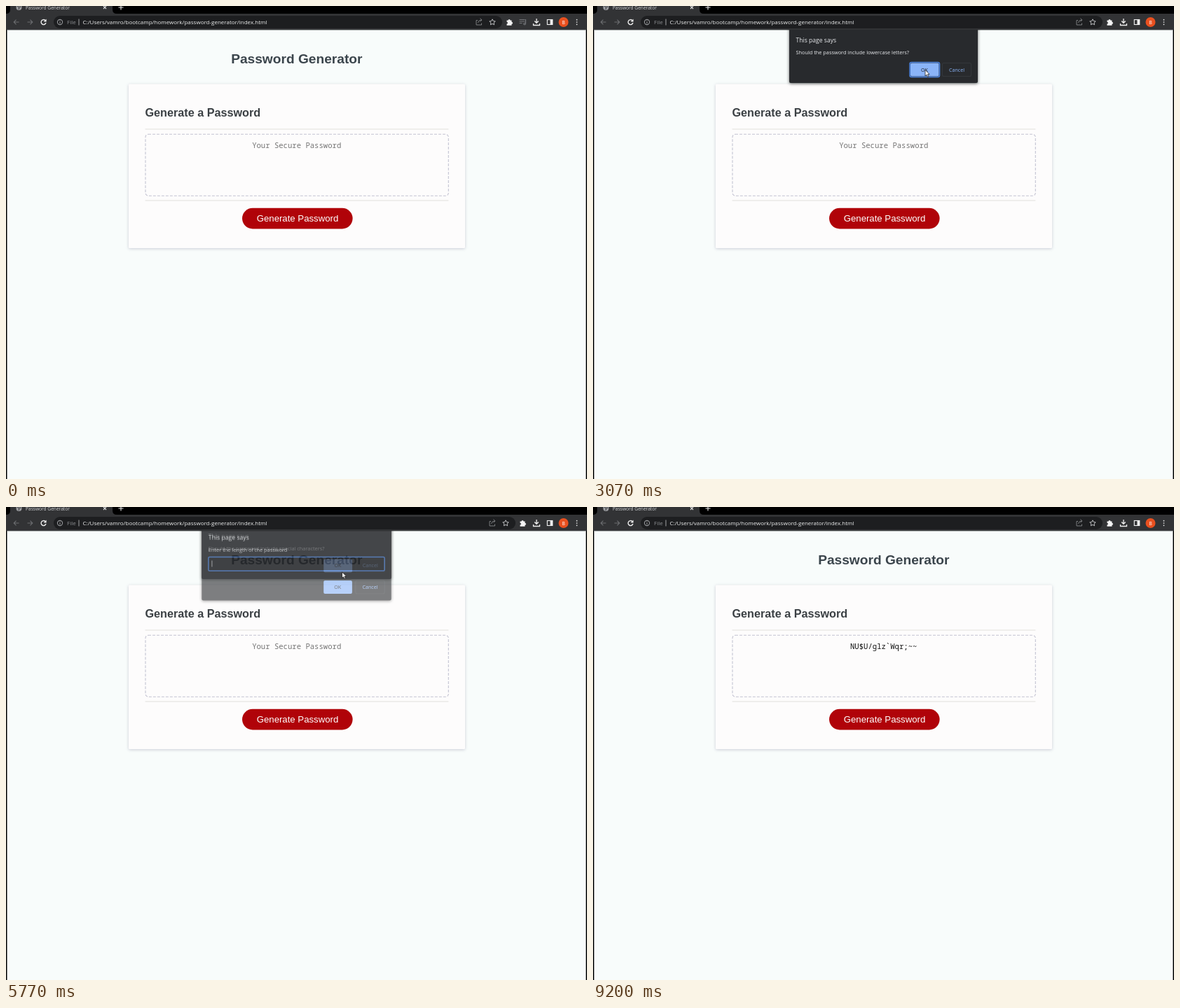
Write an HTML page that moves like this. It is 829x676 px and loops after 9230 ms.

```html
<!DOCTYPE html>
<html lang="en">
<head>
<meta charset="utf-8">
<title>Password Generator</title>
<style>
  html, body { margin: 0; width: 100%; height: 100%; overflow: hidden; background: #000; }
  svg { display: block; font-family: "Open Sans", "Noto Sans", sans-serif; }
  .page { font-family: "Liberation Sans", Arial, sans-serif; }
  .mono { font: 10.6px "Noto Sans Mono", "DejaVu Sans Mono", monospace; text-anchor: middle; }
  .line { fill: none; stroke-width: 1.1; }
  .card { filter: drop-shadow(0 1px 2px #8888a066); }
  .box { filter: drop-shadow(0 1px 2px #0009); }
</style>
</head>
<body>
<svg width="829" height="676" viewBox="0 0 829 676">
  <defs>
    <clipPath id="view"><rect x="2" y="33.5" width="825" height="643"/></clipPath>
  </defs>
  <rect width="829" height="676"/>

  <g class="page">
    <rect x="1.5" y="34" width="826" height="642" fill="#f8fcfb"/>
    <text x="414.8" y="82" font-size="19.15" font-weight="700" text-anchor="middle" fill="#3b454c">Password Generator</text>
    <rect class="card" x="175" y="111.5" width="480" height="234.5" rx="1.5" fill="#fdfcfc"/>
    <text x="198.5" y="158" font-size="16.2" font-weight="700" fill="#3b4044">Generate a Password</text>
    <path class="line" d="M198.5 176H631.5M198.5 278H631.5" stroke="#e2e2de"/>
    <rect class="line" x="199" y="183.3" width="432.3" height="88" rx="4" stroke="#c4c4d2" stroke-dasharray="4 2"/>
    <text id="result" class="mono" x="414.7" y="203"></text>
    <rect x="337" y="288.8" width="157.6" height="29.6" rx="14.8" fill="#b00309"/>
    <text x="416" y="307.7" font-size="13.2" text-anchor="middle" fill="#fff">Generate Password</text>
  </g>

  <g>
    <path d="M0 11Q6 11 6 5V0H152V5Q152 11 158 11H829V34H0Z" fill="#323335"/>
    <path d="M2 34H827" stroke="#4b4c4e" stroke-width=".8"/>
    <circle cx="18.5" cy="2" r="4" fill="#9b9da0"/>
    <path d="M16 0l3 2-1 3M19 -1l2 3" class="line" stroke="#414346"/>
    <text x="28" y="4.6" font-size="6.6" fill="#d4d6d8">Password Generator</text>
    <path class="line" d="M139 0l4 4m0 -4l-4 4M160.5 2h7M164 -1v6.5" stroke="#e8e8e8"/>
    <rect id="omnibox" x="68" y="14" height="18" rx="9" fill="#1d1e20"/>
    <path class="line" d="M18.5 23H11.5m3 -3.3l-3.3 3.3l3.3 3.3M30.5 23H37.5m-3 -3.3l3.3 3.3l-3.3 3.3" stroke="#6c6e71"/>
    <path class="line" d="M56 20.5a3.5 3.5 0 1 0 1 3.5" stroke="#eee" style="stroke-width:1.4"/>
    <path d="M57.6 18.6v4h-4z" fill="#eee"/>
    <circle class="line" cx="77" cy="23" r="3.6" stroke="#95979a"/>
    <path class="line" d="M77 22.5v2.5M77 20.7v.9M104 18.5v9" stroke="#95979a"/>
    <text x="87" y="26" font-size="8" fill="#8c8e91">File</text>
    <text x="109.5" y="26" font-size="8" fill="#eceded">C:/Users/vamro/bootcamp/homework/password-generator/index.html</text>
    <g id="tools">
      <path class="line" d="M673 20.5h-2v6.5h7.5v-2.5M673.5 24q.5 -4 5 -4m-2 -2.3l2.5 2.3l-2.5 2.3" stroke="#85878a" style="stroke-width:.9"/>
      <path class="line" d="M694 18.8l1.3 2.7 2.9.4 -2.1 2 .5 2.9 -2.6 -1.4 -2.6 1.4 .5 -2.9 -2.1 -2 2.9 -.4z" stroke="#cfd0d2" style="stroke-width:.9"/>
      <path d="M714.5 20.5h2a1.5 1.5 0 0 1 3 0h2v2.2a1.5 1.5 0 0 1 0 3v2h-7v-2.2a1.3 1.3 0 0 0 0 -2.7z" fill="#f4f4f4"/>
    </g>
    <g id="media" class="line" stroke="#74767a">
      <path d="M732.5 19.5h8M732.5 22h8M732.5 24.5h4M741.5 19v6"/>
      <circle cx="740" cy="25.5" r="1.3"/>
    </g>
    <path class="line" d="M757 18v6m-2.8 -2.5l2.8 2.8l2.8 -2.8M752.5 25v2.5h9V25" stroke="#eee" style="stroke-width:1.3"/>
    <rect class="line" x="772.3" y="19.5" width="7.5" height="7" stroke="#f4f4f4"/>
    <path d="M776.5 19.5h3.5v7h-3.5z" fill="#f4f4f4"/>
    <circle cx="795.5" cy="23" r="7" fill="#e9501f"/>
    <text x="795.5" y="25.5" font-size="7" text-anchor="middle" fill="#fff">B</text>
    <path d="M814.5 19.7v7" stroke="#eee" stroke-width="1.7" stroke-linecap="round" stroke-dasharray="0 3.3"/>
  </g>

  <g id="dialogs" clip-path="url(#view)"></g>

  <g id="cursor" fill="#fff" stroke="#111" stroke-width=".7" stroke-linejoin="round">
    <path id="arrow" d="M0 0V8.5L2 6.7 3.5 9.8 4.9 9.1 3.5 6.1H6.2Z"/>
    <path id="hand" d="M-1 .8Q0 -.4 1 .8V4Q2.2 3.4 2.7 4.4 4 4 4.3 5 5.5 5 5.5 6.2V8.5Q5 10.5 4.3 11H-.5Q-1.5 9 -3.3 7 -2.7 5.6 -1 7Z"/>
  </g>
</svg>
<script>
const LOOP = 9230, CLOSE = 150, OPEN = 125, MEDIA_GONE = 1300, DONE = 8500;
const MIDDLE = 414.5;
const ask = what => `Should the password include ${what}?`;

// message, time it opens, time it starts to close
const dialogs = [
  [ask("uppercase letters"), 660, 2155],
  [ask("lowercase letters"), 2185, 3250],
  [ask("numbers"), 3280, 4440],
  [ask("special characters"), 4470, 5665],
  ["Enter the length of the password", 5695, DONE]
];

// time, x, y
const path = [
  [120, 130, 676], [530, 349, 304], [1080, 349, 304], [1680, 474, 91.5],
  [5450, 474, 91.5], [5700, 479.5, 93], [7700, 479.5, 93]
];

const $ = id => document.getElementById(id);
const clamp = v => Math.max(0, Math.min(1, v));
const show = (el, on) => el.setAttribute("visibility", on ? "inherit" : "hidden");
const move = (el, x, y) => el.setAttribute("transform", `translate(${x} ${y})`);

function dialogMarkup([message], i) {
  const prompt = i === dialogs.length - 1, y = prompt ? 110 : 81.5;
  const ring = `<rect class="line ring" x="452" y="${y - 1}" width="42.5" height="21" rx="2.5" stroke="#4b82dc" style="stroke-width:1.6"/>`;
  const field = `<rect class="line" x="289.5" y="76.5" width="250" height="19.8" rx="1.5" stroke="#4a83df" style="fill:#202225;stroke-width:1.5"/>
    <text id="typed" x="294" y="89" font-size="7.4" fill="#e8eaed"></text>
    <path id="caret" d="M0 81.5v9" stroke="#e8eaed" stroke-width=".8"/>`;
  return `<g class="dialog">
    <rect class="box" x="280" y="20" width="269" height="${prompt ? 118.5 : 90}" rx="2" fill="#282a2d"/>
    <text x="289.5" y="52" font-size="8.6" fill="#e8eaed">This page says</text>
    <text x="289.5" y="69" font-size="7.35" fill="#e8eaed">${message}</text>
    <rect x="453" y="${y}" width="40.5" height="19" rx="2" fill="#8ab4f8"/>
    ${prompt ? field : ring}
    <rect class="line" x="498.5" y="${y}" width="41" height="19" rx="2" stroke="#34373b"/>
    <g font-size="7.1" text-anchor="middle">
      <text x="473" y="${y + 12}" fill="#202124">OK</text>
      <text x="519" y="${y + 12}" fill="#8ab4f8">Cancel</text>
    </g>
  </g>`;
}
$("dialogs").innerHTML = dialogs.map(dialogMarkup).join("");
const boxes = [...document.querySelectorAll(".dialog")];

function drawDialogs(t) {
  dialogs.forEach(([, open, close], i) => {
    const box = boxes[i], p = clamp((t - open) / OPEN), k = clamp((t - close) / CLOSE);
    show(box, p > 0 && k < 1);
    box.setAttribute("opacity", p * (1 - k ** 3));
    // the sheet tilts away slightly while it slides
    const lift = 12.5 * (1 - p) + 10 * k, grow = 1 + lift * .001;
    box.setAttribute("transform", `translate(${MIDDLE * (1 - grow)} ${-lift}) scale(${grow} 1)`);
    const ring = box.querySelector(".ring");
    if (ring) show(ring, k === 0);
  });
  const typed = t < 7740 ? "" : t < 7980 ? "1" : "15";
  $("typed").textContent = typed;
  move($("caret"), 294.5 + 4.2 * typed.length, 0);
  const since = t - (t < 7740 ? 5695 : t < 7980 ? 7740 : 7980);
  $("caret").setAttribute("opacity", since % 1060 < 530 ? 1 : 0);
}

function drawCursor(t) {
  const last = path[path.length - 1];
  show($("cursor"), t >= path[0][0] && t < last[0]);
  const i = path.findIndex(p => p[0] > t);
  if (i > 0) {
    const [t0, x0, y0] = path[i - 1], [t1, x1, y1] = path[i];
    const u = (t - t0) / (t1 - t0), e = u * u * (3 - 2 * u);
    move($("cursor"), x0 + (x1 - x0) * e, y0 + (y1 - y0) * e);
  }
  const onButton = t > 480 && t < 1150;
  show($("hand"), onButton);
  show($("arrow"), !onButton);
}

function draw(t) {
  const shift = t < MEDIA_GONE ? 0 : 19;
  move($("tools"), shift, 0);
  $("omnibox").setAttribute("width", 640 + shift);
  show($("media"), !shift);
  const done = t >= DONE;
  $("result").textContent = done ? "NU$U/glz`Wqr;~~" : "Your Secure Password";
  $("result").setAttribute("fill", done ? "#111" : "#757575");
  drawDialogs(t);
  drawCursor(t);
}

let start;
function tick(now) {
  start ??= now;
  draw((now - start) % LOOP);
  requestAnimationFrame(tick);
}
draw(0);
requestAnimationFrame(tick);
</script>
</body>
</html>
```
